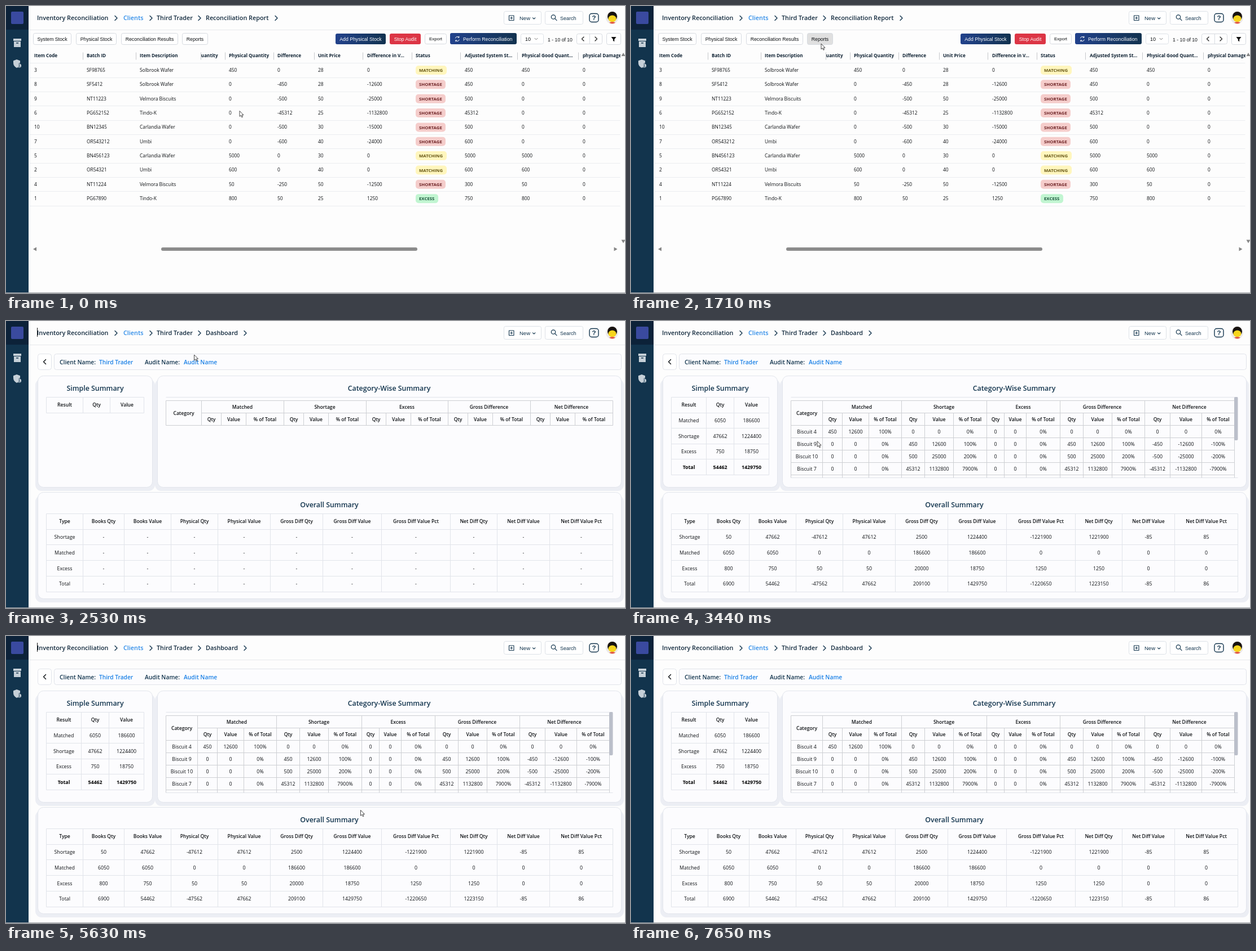
An HTML page for the animation above (7.75 s loop, 1097x510 px).

```html
<!DOCTYPE html>
<html lang="en">
<head>
<meta charset="utf-8">
<title>Inventory Reconciliation</title>
<style>
  html, body { margin: 0; width: 100%; height: 100%; overflow: hidden; background: #fdfdfd; }
  svg { display: block; width: 1097px; height: 510px; }
  text { font-family: "Open Sans", "Noto Sans", sans-serif; white-space: pre; }
  .ui { font-family: "Liberation Sans", Arial, sans-serif; }
</style>
</head>
<body>
<svg id="stage" viewBox="0 0 1097 510" xmlns="http://www.w3.org/2000/svg"></svg>
<script>
const LOOP = 7750;
const NAVY = '#12344d', LINK = '#1a80e6', INK = '#0e1114';
const PARTNER = 'Third Trader';

// ---- drawing helpers: each returns SVG markup ----
const text = (s, x, y, size = 8.4, o = {}) =>
  `<text x="${x}" y="${(y + size * 0.36).toFixed(2)}" font-size="${size}" font-weight="${o.w || 400}"` +
  ` fill="${o.c || INK}" text-anchor="${o.a || 'start'}" class="${o.k || ''}">${s}</text>`;
const mid = (s, x, y, size, o = {}) => text(s, x, y, size, { a: 'middle', ...o });
const box = (x1, y1, x2, y2, fill, stroke = 'none', r = 3) => {
  const d = stroke === 'none' ? 0 : 0.5;
  return `<rect x="${x1 + d}" y="${y1 + d}" width="${x2 - x1 - d * 2}" height="${y2 - y1 - d * 2}"` +
    ` rx="${r}" fill="${fill}" stroke="${stroke}"/>`;
};
const stroke = (d, c = NAVY, w = 1.3) =>
  `<path d="${d}" fill="none" stroke="${c}" stroke-width="${w}" stroke-linecap="round" stroke-linejoin="round"/>`;
const fill = (d, c) => `<path d="${d}" fill="${c}"/>`;
const lines = (d, c) => `<path d="${d}" fill="none" stroke="${c}" transform="translate(.5 .5)"/>`;
const hline = (x1, x2, y) => `M${x1} ${y}H${x2}`;
const vline = (x, y1, y2) => `M${x} ${y1}V${y2}`;
const chevron = x => stroke(`M${x - 2} 17.5l4 4-4 4`, NAVY, 1.4);
const crumb = (s, x, c = '#10283c') => text(s, x, 21, 10.8, { w: 600, c });
const button = (s, x1, x2, y1 = 48, y2 = 69, id = '') =>
  `<g id="${id}">${box(x1, y1, x2, y2, '#fff', '#d6dae0')}</g>` +
  mid(s, (x1 + x2) / 2, 58.5, s === 'Export' ? 8 : 8.7, { k: 'ui' });
const centers = xs => xs.slice(1).map((x, i) => (x + xs[i]) / 2);

// ---- frame shared by both pages ----
function shell() {
  return box(0, 0, 40, 510, NAVY, 'none', 0) + box(0, 0, 40, 42, '#0c2239', 'none', 0) +
    box(9, 10, 31, 32, '#3a4a9f', 'none', 2) +
    fill('M13 58h14v4H13zM14 63h12v10H14zM18 65v1.6h4V65z', '#c6d0d8') +
    fill('M19 95l6 2.3v4a4.3 4.3 0 0 0-3 7.2l-3 1.5c-4-2-6-5-6-8.7v-4z', '#c6d0d8') +
    '<circle cx="23.5" cy="106" r="3.6" fill="#c6d0d8"/>' +
    '<circle cx="23.5" cy="105" r="1" fill="#12344d"/><path d="M21.8 107.8h3.4" stroke="#12344d"/>' +
    lines(hline(41, 1097, 42), '#e6e8ec') +
    crumb('Inventory Reconciliation', 55) + chevron(195) +
    crumb('Clients', 208, '#2a8ae8') + chevron(257) +
    crumb(PARTNER, 267) + chevron(343) +
    box(882, 9, 949, 33, '#fff', '#dde1e7') +
    stroke('M891.5 17h8.5v8.5h-8.5zM895.75 19.3v4M893.75 21.3h4', NAVY, 1.1) +
    text('New', 910, 21.5, 9.5, { k: 'ui', c: NAVY }) + stroke('M933.5 20.8l2.2 2.2 2.2-2.2', NAVY, 1.1) +
    box(955, 9, 1023, 33, '#fff', '#dde1e7') +
    '<circle cx="970" cy="19.5" r="3.7" fill="none" stroke="#12344d" stroke-width="1.2"/>' +
    stroke('M972.8 22.3l3.2 3.4', NAVY, 1.2) +
    text('Search', 982, 21.5, 9, { k: 'ui', c: NAVY }) +
    `<rect x="1034" y="13.5" width="16" height="15" rx="4" fill="none" stroke="${NAVY}" stroke-width="1.4"/>` +
    mid('?', 1042, 21, 11.5, { w: 700, k: 'ui', c: NAVY }) +
    '<circle cx="1074" cy="21" r="11" fill="#eceaea"/><circle cx="1074.5" cy="18.5" r="8.5" fill="#17120f"/>' +
    '<ellipse cx="1074.5" cy="22.5" rx="7" ry="6" fill="#f7d51d"/>' +
    fill('M1069 29.5q5.5-3 11 0-5.5 4-11 0z', '#e2553f');
}

// ---- stock report ----
const HEADS = [
  [50, 'Item Code'], [143, 'Batch ID'], [237, 'Item Description'], [395, 'Physical Quantity'],
  [481, 'Difference'], [553, 'Unit Price'], [640, 'Difference in V...'], [726, 'Status'],
  [813, 'Adjusted System St...'], [914, 'Physical Good Quant...'], [1022, 'physical Damaged']
];
const STOCK = `3|SF98765|Solbrook Wafer|450|0|28|0|M|450|450
8|SF5412|Solbrook Wafer|0|-450|28|-12600|S|450|0
9|NT11223|Velmora Biscuits|0|-500|50|-25000|S|500|0
6|PG652152|Tindo-K|0|-45312|25|-1132800|S|45312|0
10|BN12345|Carlandia Wafer|0|-500|30|-15000|S|500|0
7|OR543212|Umbi|0|-600|40|-24000|S|600|0
5|BN456123|Carlandia Wafer|5000|0|30|0|M|5000|5000
2|OR54321|Umbi|600|0|40|0|M|600|600
4|NT11224|Velmora Biscuits|50|-250|50|-12500|S|300|50
1|PG67890|Tindo-K|800|50|25|1250|E|750|800`;
const BADGES = {
  M: ['MATCHING', 781, '#fff6bd', '#655614'],
  S: ['SHORTAGE', 779, '#f5cdcb', '#6e2426'],
  E: ['EXCESS', 766, '#c1f5d1', '#17533a']
};

function badge(key, y) {
  const [label, right, bg, ink] = BADGES[key];
  return box(726, y - 8, right, y + 8, bg, 'none', 5) + text(label, 732, y + 0.3, 7.8, { w: 700, c: ink });
}

function report() {
  let s = crumb('Reconciliation Report', 354) + chevron(479);
  s += button('System Stock', 48, 116) + button('Physical Stock', 124, 196) +
    button('Reconciliation Results', 204, 305) + button('Reports', 312, 358, 48, 69, 'reports');
  s += box(584, 49, 673, 68, 'url(#navy)') + mid('Add Physical Stock', 628.5, 58.5, 8.7, { k: 'ui', c: '#fff' }) +
    box(680, 49, 735, 68, '#dc3545') + mid('Stop Audit', 707.5, 58.5, 8.7, { k: 'ui', c: '#fff' }) +
    button('Export', 742, 781, 49, 68) +
    box(787, 48, 905, 68, 'url(#navy)') + text('Perform Reconciliation', 810, 58.5, 8.7, { k: 'ui', c: '#fff' }) +
    stroke('M796.5 57a3.5 3.5 0 0 1 6.3-1v-2M802.8 56h-2M803.2 60a3.5 3.5 0 0 1-6.3 1v2M796.9 61h2', '#fff', 1) +
    box(912, 49, 953, 68, '#fff', '#dde1e7') + text('10', 920, 58.5, 9, { k: 'ui' }) +
    stroke('M937 57.3l2.5 2.5 2.5-2.5', '#777', 1) +
    text('1 - 10 of 10', 960, 59.5, 8.7, { k: 'ui' }) +
    box(1011, 49, 1057, 68, '#fff', '#d6dae0') + lines(vline(1034, 49, 67), '#d6dae0') +
    stroke('M1024 55l-3.5 3.5 3.5 3.5M1044 55l3.5 3.5-3.5 3.5', '#222', 1.3) +
    box(1064, 48, 1090, 69, '#fff', '#d6dae0') + fill('M1072.5 55h9l-3.3 4.2v4l-2.4-1.5v-2.5z', '#111');

  const head = { w: 700, c: '#0f2233' };
  s += '<g clip-path="url(#grid)">' + HEADS.map(([x, h]) => text(h, x, 88, 8.1, head)).join('') + '</g>';
  s += '<g clip-path="url(#pinned)">' + text('System Quantity', 375.5, 88, 8.1, { ...head, a: 'end' }) + '</g>';
  s += lines([136, 230, 345, 388, 474, 546, 632, 719, 805, 906, 1014].map(x => vline(x, 82, 95)).join(''), '#c6c8cb');

  let rules = hline(41, 1088, 101);
  STOCK.split('\n').forEach((row, r) => {
    const y = 114 + r * 25.35;
    rules += hline(41, 1088, Math.round(y + 12.5));
    [...row.split('|'), '0'].forEach((v, i) => {
      s += i === 7 ? badge(v, y) : text(v, HEADS[i][0], y);
    });
  });
  s += lines(rules, '#ebedf0');
  s += box(275, 429, 729, 435, '#8c8c8c') +
    fill('M54 428.5v7l-6-3.5zM1077.5 428.5v7l6-3.5zM1090.5 89h7l-3.5-6zM1090.5 415.5h7l-3.5 6z', '#858585');
  return s;
}

// ---- dashboard ----
const SIMPLE = `Matched|6050|186600
Shortage|47662|1224400
Excess|750|18750
Total|54462|1429750`;
const CATEGORY = `Biscuit 4|450|12600|100%|0|0|0%|0|0|0%|0|0|0%|0|0|0%
Biscuit 9|0|0|0%|450|12600|100%|0|0|0%|450|12600|100%|-450|-12600|-100%
Biscuit 10|0|0|0%|500|25000|200%|0|0|0%|500|25000|200%|-500|-25000|-200%
Biscuit 7|0|0|0%|45312|1132800|7900%|0|0|0%|45312|1132800|7900%|-45312|-1132800|-7900%`;
const OVERALL = `Shortage|50|47662|-47612|47612|2500|1224400|-1221900|1221900|-85|85
Matched|6050|6050|0|0|186600|186600|0|0|0|0
Excess|800|750|50|50|20000|18750|1250|1250|0|0
Total|6900|54462|-47562|47662|209100|1429750|-1220650|1223150|-85|86`;
const GROUPS = ['Matched', 'Shortage', 'Excess', 'Gross Difference', 'Net Difference'];
const BOLD = { w: 600, c: '#0e1114' };
const CELL = 8.8, HEAD = 8.6;

// plain table: header row plus data rows of equal height
function grid(xs, top, step, heads, rows, boldLast) {
  const cx = centers(xs), n = rows.length + 1;
  const ys = Array.from({ length: n + 1 }, (_, i) => Math.round(top + i * step));
  const cells = (vals, i, size, o) =>
    vals.map((v, k) => mid(v, cx[k] + 0.5, top + step * (i + 0.5) + 0.5, size, o)).join('');
  return lines(ys.map(y => hline(xs[0], xs.at(-1), y)).join('') +
    xs.map(x => vline(x, top, ys[n])).join(''), '#e1e4ea') +
    cells(heads, 0, HEAD, BOLD) +
    rows.map((r, i) => cells(r, i + 1, CELL, boldLast && i === rows.length - 1 ? { w: 700, c: '#000' } : {})).join('');
}

function categoryTable(xs, rows) {
  const cx = centers(xs).map(x => x + 0.5), end = xs.at(-1), bottom = rows.length ? 278 : 185;
  let d = hline(283, end, 141) + hline(xs[1], end, 163);
  for (let i = 0; i <= rows.length; i++) d += hline(283, end, 185 + i * 22);
  xs.forEach((x, i) => d += vline(x, i % 3 === 1 || i === 0 ? 141 : 163, bottom));
  let s = lines(hline(283, 1075, 135) + (rows.length ? hline(283, 1075, 278) : ''), '#e1e4ea') + lines(d, '#cdcfd3');
  s += mid('Category', cx[0], 164, HEAD, BOLD);
  GROUPS.forEach((g, i) => {
    const k = 1 + i * 3;
    s += mid(g, (xs[k] + xs[k + 3]) / 2, 153, HEAD, BOLD);
    ['Qty', 'Value', '% of Total'].forEach((h, j) => s += mid(h, cx[k + j], 175, HEAD, BOLD));
  });
  rows.forEach((r, i) => r.forEach((v, k) => s += mid(v, cx[k], 197 + i * 21.9, CELL)));
  return s + (rows.length ? box(1069, 135, 1075.5, 212, '#bbbfca', 'none', 2) : '');
}

const shadow = (x1, y1, x2, y2) => box(x1 - 4, y1 + 6, x2 + 4, y2 + 6, '#eceef4', 'none', 11);
const card = (x1, y1, x2, y2) => box(x1, y1, x2, y2, '#fcfcfe', '#e2e5ec', 10);

function dashboardFrame() {
  const areas = [[56, 97, 260, 296], [268, 97, 1091, 296], [56, 304, 1091, 494]];
  const title = { w: 600, c: NAVY };
  return crumb('Dashboard', 354) + chevron(424) +
    box(56, 58, 81, 87, '#fff', '#e1e4ea', 4) + stroke('M70.5 68.5l-4 4 4 4', '#15191d', 1.5) +
    box(85, 58, 1091, 87, '#fcfcfe', '#e1e4ea', 4) +
    text('Client Name:', 95, 73, 10.3, title) + text(PARTNER, 165, 73, 10.2, { w: 600, c: LINK }) +
    text('Audit Name:', 246, 73, 10.3, title) + text('Audit Name', 315, 73, 10.3, { w: 600, c: LINK }) +
    areas.map(a => shadow(...a)).join('') + areas.map(a => card(...a)).join('') +
    mid('Simple Summary', 158, 119.5, 12.4, title) +
    mid('Category-Wise Summary', 679, 119.5, 12.4, title) +
    mid('Overall Summary', 573, 326.5, 12.4, title);
}

function dashboardData(loaded) {
  const parse = s => s.split('\n').map(r => r.split('|'));
  const overall = parse(OVERALL).map(r => loaded ? r : r.map((v, i) => i ? '-' : v));
  const empty = [283, 346], full = [283, 339, 374, 421, 479, 520, 571, 630, 661, 700, 760, 801, 852, 910, 955, 1011, 1069];
  for (let g = 0; g < 5; g++) [35, 79, 145.8].forEach(w => empty.push(Math.round(346 + g * 145.8 + w)));
  return grid(loaded ? [71, 133, 182, 244] : [71, 136, 184, 244], 135, 27.6,
      ['Result', 'Qty', 'Value'], loaded ? parse(SIMPLE) : [], true) +
    categoryTable(loaded ? full : empty, loaded ? parse(CATEGORY) : []) +
    grid([71, 136, 209, 292, 375, 468, 561, 665, 787, 870, 963, 1075], 342, 27.7,
      ['Type', 'Books Qty', 'Books Value', 'Physical Qty', 'Physical Value', 'Gross Diff Qty', 'Gross Diff Value',
        'Gross Diff Value Pct', 'Net Diff Qty', 'Net Diff Value', 'Net Diff Value Pct'], overall);
}

// ---- stage ----
const stage = document.getElementById('stage');
stage.innerHTML = `<defs>
  <linearGradient id="navy"><stop offset="0" stop-color="#22428c"/><stop offset="1" stop-color="#12324f"/></linearGradient>
  <clipPath id="grid"><rect x="41" y="76" width="1048" height="25"/></clipPath>
  <clipPath id="pinned"><rect x="345.5" y="76" width="42" height="25"/></clipPath>
</defs>
<rect width="1097" height="510" fill="#fdfdfd"/>${shell()}
<g id="report">${report()}</g>
<g id="dash">${dashboardFrame()}</g>
<g id="empty">${dashboardData(false)}</g>
<g id="full">${dashboardData(true)}</g>
<rect id="caret" x="55" y="12" width="1" height="16" fill="#111"/>
<rect y="509" width="1097" height="1" fill="#a3a7ab"/>
<path id="cursor" d="M0 0V9.8L2.3 7.8 3.9 11.3 5.5 10.6 4 7.2H7Z" fill="#fff" stroke="#333" stroke-width=".9" stroke-linejoin="round"/>`;

const el = id => document.getElementById(id);
const show = (id, on) => el(id).setAttribute('visibility', on ? 'visible' : 'hidden');
const reportsFill = el('reports').firstElementChild;

// time, x, y
const PATH = [
  [0, 414, 186.5], [900, 414, 186.5], [1170, 343, 112], [1400, 340, 90], [1650, 338, 70], [1710, 337, 67],
  [1860, 333.5, 60], [3030, 333.5, 60], [3440, 330.5, 213.5], [3550, 290, 226], [3680, 211, 198],
  [4060, 211, 198], [4680, 57, 112], [5230, 57, 112], [5630, 628.5, 309.5], [6050, 628.5, 309.5],
  [6290, 941, 444], [6580, 941, 444], [6800, 1034, 466], [7060, 970, 512], [LOOP, 970, 512]
];
const CARET = [[2530, 3030], [3530, 4060], [4560, 5080], [5580, 6080], [6580, 7060], [7600, 7650]];

function cursorAt(t) {
  const i = Math.max(1, PATH.findIndex(p => p[0] > t));
  const [t0, x0, y0] = PATH[i - 1], [t1, x1, y1] = PATH[i];
  const k = (t - t0) / (t1 - t0);
  return [x0 + (x1 - x0) * k, y0 + (y1 - y0) * k];
}

function render(t) {
  show('report', t < 2530);
  show('dash', t >= 2530);
  show('empty', t >= 2530 && t < 2620);
  show('full', t >= 2620);
  show('caret', CARET.some(([a, b]) => t >= a && t < b));
  show('cursor', t < 7060);
  reportsFill.setAttribute('fill', t < 1710 ? '#fff' : t >= 2250 && t < 2290 ? '#d4d4d4' : '#e0e0e0');
  el('cursor').setAttribute('transform', `translate(${cursorAt(t).map(v => v.toFixed(1)).join(' ')})`);
}

const start = performance.now();
function tick() {
  render((performance.now() - start) % LOOP);
  requestAnimationFrame(tick);
}
tick();
</script>
</body>
</html>
```
